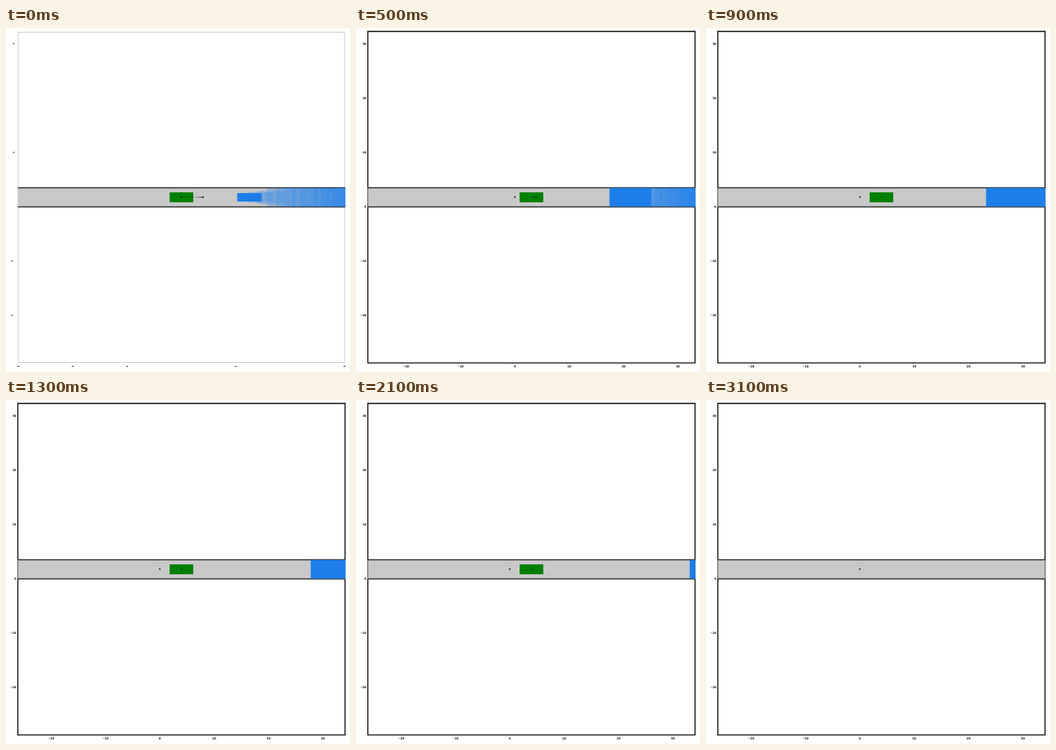
An HTML page for the animation above (3.5 s loop, 450 px wide and 450 px high).

```html
<!DOCTYPE html>
<html lang="en">
<head>
<meta charset="utf-8">
<title>Braking on a straight road</title>
<style>
  html, body { margin: 0; width: 100%; height: 100%; overflow: hidden; background: #fff; }
  svg { display: block; width: 100vw; height: 100vh; }
  text { font: bold 3.6px "DejaVu Sans", sans-serif; }
</style>
</head>
<body>
<svg viewBox="0 0 450 450">
  <defs><clipPath id="lane"><rect x="15" y="209" width="429" height="25"/></clipPath></defs>
  <path id="frame" fill="none"/>
  <g id="ticks"></g>
  <rect x="15.5" y="209" width="428" height="25" fill="#c8c8c8"/>
  <path d="M16 221.5H443" stroke="#cfcfcf"/>
  <path d="M15.5 209H443.5M15.5 234H443.5" stroke="#444" stroke-width="1.5"/>
  <g id="prediction" clip-path="url(#lane)" fill="#1d7eea"></g>
  <path d="M16 209H443.5M16 234H443.5" stroke="#333" stroke-opacity=".55"/>
  <rect id="car" x="214" y="215" width="31" height="13" fill="#008000"/>
  <g id="dots"></g>
</svg>
<script>
const LOOP = 3500, STEP = 100;
const CAR_X = 229.5, LANE_Y = 221.5;
const GRID = 71.1;             // pixels per ten metres
const STOP = 9.7, HORIZON = 25;
const el = id => document.getElementById(id);

// Distance driven by the braking car after a number of steps.
const travelled = step => 28.3 - 0.3 * Math.max(0, STOP - step) ** 2;

// Region the vehicle ahead may occupy at one step.
function region(step, origin, opacity) {
  const left = origin + Math.max(73, 241 - 0.279 * Math.max(0, 25.5 - step) ** 2);
  const right = Math.min(444, origin + 105 + 14.7 * step);
  if (left >= right) return "";
  const half = 5.5 + 0.58 * step * step;
  const rear = half - 0.7 * Math.min(step, 3);
  const bend = Math.min(right, left + 16);
  const points = [
    [left, -rear], [bend, -half], [right, -half],
    [right, half], [bend, half], [left, rear]
  ].map(([x, y]) => `${x.toFixed(2)},${(LANE_Y + y).toFixed(2)}`).join(" ");
  return `<polygon points="${points}" fill-opacity="${opacity}"/>`;
}

function prediction(step, origin) {
  if (step >= 28) return "";
  const now = Math.min(step, HORIZON);
  let shapes = "";
  for (let s = now + 1; s <= HORIZON; s++) shapes += region(s, origin, 0.2);
  return shapes + region(now, origin, 1);
}

const label = (x, y, value, anchor) =>
  `<text x="${x}" y="${y}" text-anchor="${anchor}">${String(value).replace("-", "−")}</text>`;
const fragment = (x, y) => `<path d="M${x - 1.2} ${y}h2.4" stroke="#333"/>`;

function ticks(origin, faint) {
  let marks = "";
  for (let n = -3; n <= 3; n++) {
    const x = origin + n * GRID;
    const y = 233.7 - n * GRID;
    const showX = x > 13 && x < 444;
    const showY = y > 5 && y < 438;
    if (faint) {
      if (showX && n !== 0 && n !== 2) marks += fragment(x, 442.5);
      if (showY && n !== 0 && n !== 2) marks += fragment(n < 0 ? 8 : 10, y);
    } else {
      if (showX && x > 16) marks += label(x, 443.8, n * 10, "middle");
      if (showY) marks += label(13.5, y + 1.3, n * 10, "end");
    }
  }
  return marks;
}

const dot = (x, r) => `<circle cx="${x}" cy="221.3" r="${r}" fill="#081018"/>`;

function dots(step, origin) {
  let marks = dot(origin, 1);
  if (step < 28) {
    for (let s = step + 1; s < STOP; s++) marks += dot(origin + travelled(s), 0.65);
    marks += dot(origin + 28.3, step ? 0.8 : 1.1);
  }
  return marks;
}

function draw(ms) {
  const step = Math.floor(ms / STEP);
  const first = step === 0;
  const origin = CAR_X - travelled(step);
  const frame = el("frame");
  frame.setAttribute("d", first
    ? "M16 5.5H443V437.5H16Z"
    : "M15.5 3.5V438.2H443.5V3.5M15.5 4.5H443.5");
  frame.setAttribute("stroke", first ? "#ccc" : "#000");
  frame.setAttribute("stroke-width", first ? 1 : 1.3);
  el("ticks").innerHTML = ticks(origin, first);
  el("prediction").innerHTML = prediction(step, origin);
  el("car").setAttribute("visibility", step < 31 ? "visible" : "hidden");
  el("dots").innerHTML = dots(step, origin);
}

const start = performance.now();
function tick() {
  draw((performance.now() - start) % LOOP);
  requestAnimationFrame(tick);
}
tick();
</script>
</body>
</html>
```
